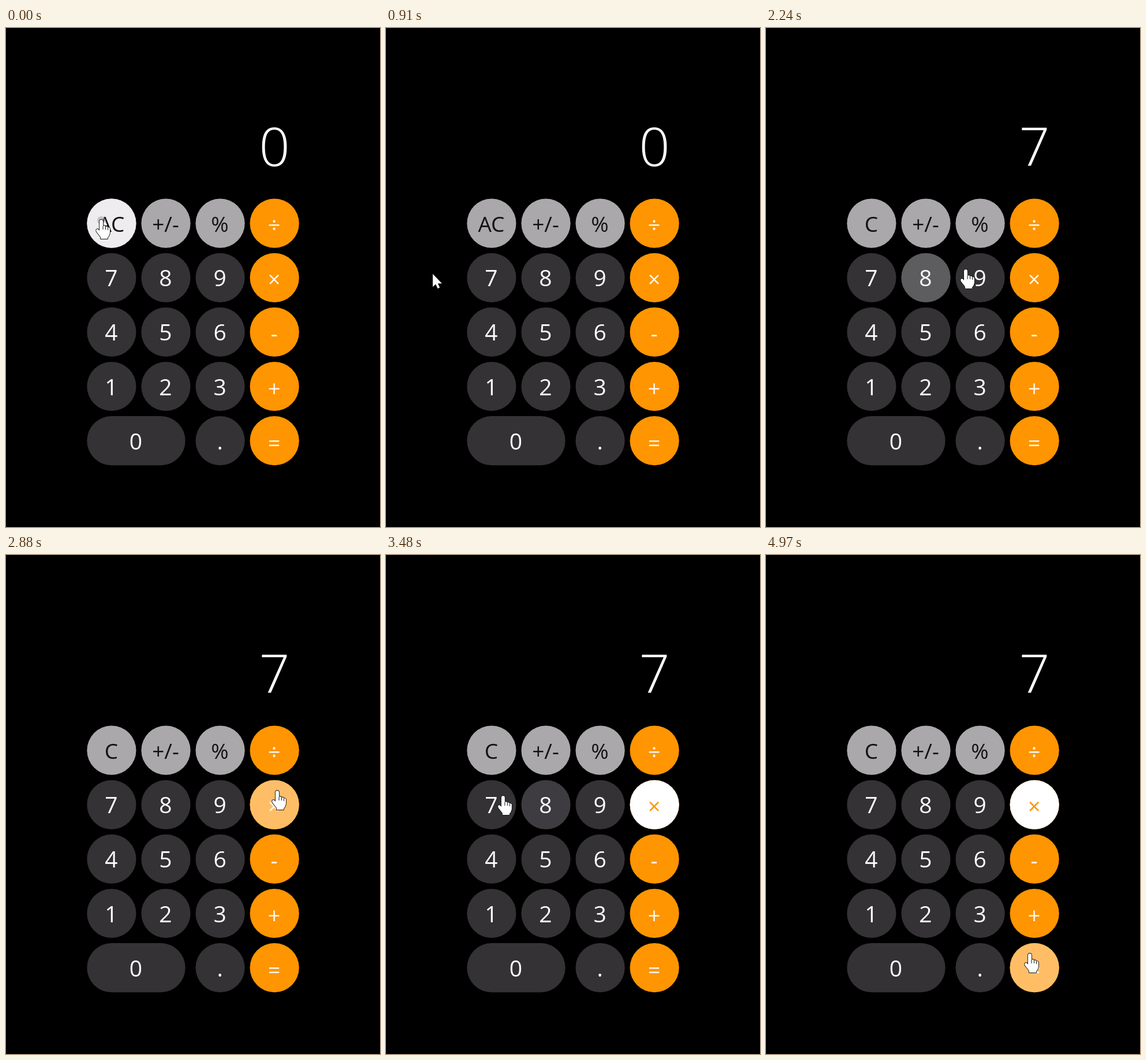
Recreate the animation shown at these times as an HTML page with a canvas. Size 648x864 px, loop 5000 ms.

```html
<!DOCTYPE html>
<html lang="en">
<head>
<meta charset="utf-8">
<title>Calculator</title>
<style>
html, body { margin: 0; height: 100%; overflow: hidden; background: #000; }
canvas { display: block; }
</style>
</head>
<body>
<canvas id="stage" width="648" height="864"></canvas>
<script>
const ctx = document.getElementById('stage').getContext('2d');
const LOOP = 5000, LAG = 60, FADE = 80;
const PITCH = 94.1, LEFT = 182.9, TOP = 338.2, RADIUS = 42.6, REACH = 39;
const ENTER = 1590, SELECT = 2900, CLICKS = [-30, 1580, 2660, 3780];

const ORANGE = '#ff9500';
const STYLES = {
  func: { base: '#aaa8ab', lit: '#eeecef', ink: '#121212', size: 37, drop: 15 },
  num: { base: '#343235', lit: '#6b696c', ink: '#fff', size: 39, drop: 15 },
  op: { base: ORANGE, lit: '#ffbe66', ink: '#fff7eb', size: 38, drop: 17 }
};
const KEYS = [['AC', '+/-', '%', '÷'], ['7', '8', '9', '×'], ['4', '5', '6', '-'], ['1', '2', '3', '+'], ['0', '', '.', '=']]
  .flatMap((labels, row) => labels.map((text, col) => ({
    text, x: LEFT + PITCH * col, y: TOP + PITCH * row,
    width: RADIUS * (text === '0' ? 4 : 2),
    style: STYLES[col === 3 ? 'op' : row === 0 ? 'func' : 'num']
  }))).filter(key => key.text);

// Pointer stops: time, x, y
const PATH = [
  [0, 165, 333], [760, 71, 418], [910, 81, 426], [1500, 183, 432], [1750, 183, 432],
  [2650, 470, 409], [2900, 470, 409], [3390, 236, 417], [3480, 203, 418], [3700, 185, 432],
  [4030, 185, 432], [4300, 205, 462], [4360, 238, 517], [4550, 362, 636], [4970, 457, 691], [LOOP, 457, 691]
];

const HAND = new Path2D('M-3 2Q-3-1 0-1Q3-1 3 2V10Q6 8 7.5 11Q10 9.5 11.5 12.5Q15 11.5 15 15V22Q14 27 11 30V32H-1V29L-8 20Q-10 16-7 15Q-5 15-3 18Z');
const KNUCKLES = new Path2D('M3 10V16M7.5 11V16M11.5 12.5V17');
const ARROW = new Path2D('M0 0V22L5 17.5L8.5 25L12 23.5L8.7 16.3H15.7Z');

const clamp = v => Math.max(0, Math.min(1, v));

// Rate of change at a stop; zero where the pointer turns or rests
function slope(i, axis) {
  const p = PATH[i - 1], q = PATH[i], r = PATH[i + 1];
  if (!p || !r) return 0;
  const before = (q[axis] - p[axis]) / (q[0] - p[0]), after = (r[axis] - q[axis]) / (r[0] - q[0]);
  return before * after > 0 ? 2 * before * after / (before + after) : 0;
}

// Smooth curve through the stops
function pointer(time) {
  const t = Math.max(0, time), i = PATH.findIndex(p => p[0] > t) - 1;
  const a = PATH[i], b = PATH[i + 1], span = b[0] - a[0], k = (t - a[0]) / span;
  return [1, 2].map(axis =>
    a[axis] + (b[axis] - a[axis]) * k * k * (3 - 2 * k) +
    span * k * (1 - k) * (slope(i, axis) * (1 - k) - slope(i + 1, axis) * k));
}

function isOver(key, [x, y]) {
  const nearest = Math.max(key.x, Math.min(key.x + key.width - 2 * RADIUS, x));
  return Math.hypot(x - nearest, y - key.y) < REACH;
}

// Share of the recent past that the pointer spent on the key
function glow(key, trail) {
  return (trail.filter(point => isOver(key, point)).length / trail.length) ** 2;
}

function label(text, x, y, size, weight) {
  ctx.font = `${weight} ${size}px "Open Sans", "Noto Sans", sans-serif`;
  ctx.fillText(text, x, y);
}

function drawKey(key, t, trail) {
  const { style, width } = key, left = key.x - RADIUS;
  const chosen = key.text === '×' ? clamp((t - SELECT) / 250) : 0;
  ctx.beginPath();
  ctx.roundRect(left, key.y - RADIUS, width, 2 * RADIUS, RADIUS);
  for (const [color, alpha] of [[style.base, 1], [style.lit, glow(key, trail)], ['#fff', chosen]]) {
    ctx.globalAlpha = alpha;
    ctx.fillStyle = color;
    ctx.fill();
  }
  ctx.globalAlpha = 1;
  ctx.fillStyle = chosen > 0.5 ? ORANGE : style.ink;
  const text = key.text === 'AC' && t >= ENTER ? 'C' : key.text;
  label(text, left + width / 2 - 0.5, key.y + style.drop, style.size, 400);
}

function drawRipple(age, x, y) {
  if (age < 0 || age > 1) return;
  ctx.fillStyle = `rgba(160,160,160,${0.6 * (1 - age)})`;
  ctx.beginPath();
  ctx.arc(x, y, 5 + 16 * age, 0, 2 * Math.PI);
  ctx.fill();
}

function drawPointer(t) {
  const [x, y] = pointer(t), onKey = KEYS.some(key => isOver(key, [x, y]));
  const shape = onKey ? HAND : ARROW;
  CLICKS.forEach(click => drawRipple((t - click) / 240, x, y));
  ctx.save();
  ctx.translate(x, y);
  ctx.lineJoin = 'round';
  ctx.lineWidth = 1.8;
  ctx.strokeStyle = '#111';
  ctx.fillStyle = '#fff';
  ctx.stroke(shape);
  ctx.fill(shape);
  ctx.lineWidth = 1;
  if (onKey) ctx.stroke(KNUCKLES);
  ctx.restore();
}

function draw(now) {
  const t = now % LOOP;
  const trail = Array.from({ length: 16 }, (_, i) => pointer(t - LAG - FADE * i / 16));
  ctx.fillStyle = '#000';
  ctx.fillRect(0, 0, 648, 864);
  ctx.textAlign = 'center';
  ctx.fillStyle = '#fff';
  label(t < ENTER ? '0' : '7', 465, 239, 93, 300);
  KEYS.forEach(key => drawKey(key, t, trail));
  drawPointer(t);
  requestAnimationFrame(draw);
}
requestAnimationFrame(draw);
</script>
</body>
</html>
```
